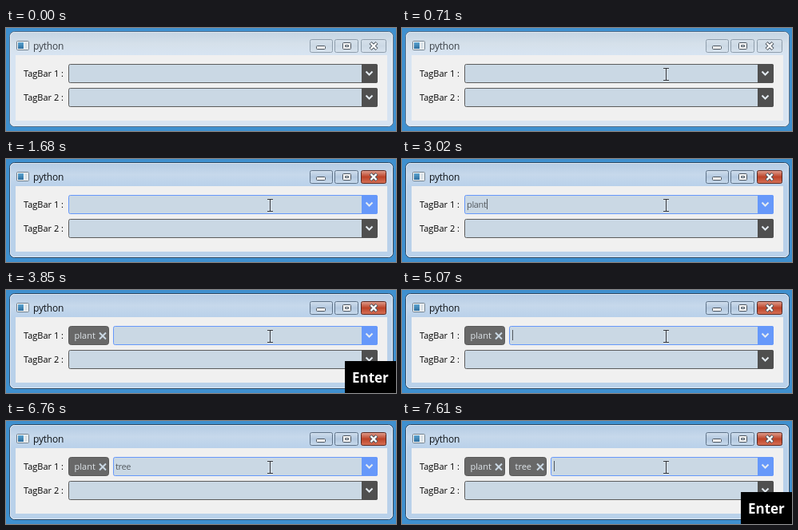
These frames come from a looping animation (488 px wide and 129 px high, 8000 ms). An HTML page with a canvas:

```html
<!DOCTYPE html>
<html lang="en">
<head>
<meta charset="utf-8">
<title>Tag bar</title>
<style>
html, body { margin: 0; width: 100%; height: 100%; overflow: hidden; background: #3f90cf; }
canvas { display: block; }
</style>
</head>
<body>
<canvas width="488" height="129"></canvas>
<script>
const c = document.querySelector('canvas').getContext('2d');
const LOOP = 8000, FOCUS = 830, CLICK_END = 950;
const SANS = '"Open Sans", "Noto Sans", sans-serif';

// [time, text in the field]
const TYPING = [
  [0, ''], [2410, 'pl'], [2650, 'pla'], [2770, 'plan'], [3020, 'plant'], [3620, ''],
  [5190, 't'], [5310, 'tr'], [5670, 'tre'], [5790, 'tree'], [7240, '']
];
const TAGS = [
  { at: 3620, text: 'plant', x: 78, w: 51 },
  { at: 7240, text: 'tree', x: 134, w: 47 }
];
const CARET_ON = [[FOCUS, 1680], [2410, 3850], [4700, 6760], [7610, LOOP]];
const ENTER_ON = [[3620, 5070], [7240, LOOP]];
const ADVANCE = { p: 6, l: 2, a: 6, n: 6, t: 4, r: 4, e: 6 };

const within = (t, spans) => spans.some(([a, b]) => t >= a && t < b);

function rect(x, y, w, h, fill) {
  c.fillStyle = fill;
  c.fillRect(x, y, w, h);
}

function box(x, y, w, h, r, fill, stroke) {
  c.beginPath();
  c.roundRect(x + .5, y + .5, w - 1, h - 1, r);
  c.fillStyle = fill;
  c.fill();
  if (stroke) line(stroke, 1);
}

function line(color, width) {
  c.strokeStyle = color;
  c.lineWidth = width;
  c.stroke();
}

function path(...points) {
  c.beginPath();
  points.forEach(([x, y], i) => i ? c.lineTo(x, y) : c.moveTo(x, y));
}

function cross(x, y, r, color, width) {
  c.beginPath();
  for (const s of [-1, 1]) {
    c.moveTo(x - r, y - r * s);
    c.lineTo(x + r, y + r * s);
  }
  line(color, width);
}

function text(str, x, y, font, color, spacing = 0) {
  c.font = font + ' ' + SANS;
  c.letterSpacing = spacing + 'px';
  c.fillStyle = color;
  c.fillText(str, x, y);
}

function shade(y0, y1, ...colors) {
  const g = c.createLinearGradient(0, y0, 0, y1);
  colors.forEach((color, i) => g.addColorStop(i / (colors.length - 1), color));
  return g;
}

function drawWindow(active) {
  rect(0, 0, 488, 129, '#3f90cf');
  const glass = active ? ['#b4cbe4', '#c6d8eb', '#b9d1ea'] : ['#c4d4e3', '#d5e0ea', '#d7e4f2'];
  box(4, 4, 481, 120, 6, shade(5, 34, ...glass), active ? '#2e4862' : '#587089');
  c.beginPath();
  c.roundRect(5.5, 5.5, 478, 117, 5);
  line(active ? '#dfeaf6' : '#e6eef6', 1);
  rect(12, 34, 465, 82, '#f0f0f0');

  box(13, 16, 16, 12, 1, '#f8fafb', '#6f7f8c');
  rect(15, 18, 7, 8, shade(18, 26, '#5aa3cf', '#2e6f9f'));
  rect(23, 18, 4, 8, '#dbe3e8');
  text('python', 34, 27, '12px', active ? '#101418' : '#3c4248', -.2);

  const face = active ? ['#d3e0ee', '#b3c8df', '#c9dbed'] : ['#d6e1eb', '#ccd9e5', '#d8e3ee'];
  const edge = active ? '#5f7389' : '#8f9eac', mark = '#49525c';
  for (const [x, w] of [[380, 29], [411, 30], [444, 32]]) {
    const red = active && x === 444;
    box(x, 14, w, 17, 2, shade(14, 31, ...(red ? ['#e2a596', '#bd4429', '#d8745a'] : face)),
      red ? '#5c2820' : edge);
  }
  box(388, 22, 12, 5, 1, '#fff', mark);
  box(421, 18, 11, 9, 1, '#fff', mark);
  box(424, 21, 5, 3, 0, '#dfe8f1', mark);
  cross(460, 22.5, 4, mark, 4.2);
  cross(460, 22.5, 3.6, '#fff', 2.2);
}

function drawField(x, y, focus) {
  const color = focus ? '#6698fa' : '#4f4f4f';
  box(x, y, 465 - x, 24, 2, '#cad8e4', focus ? color : '#5c5c5c');
  c.beginPath();
  c.roundRect(445, y, 20, 24, [0, 2, 2, 0]);
  c.fillStyle = color;
  c.fill();
  path([450.5, y + 9.5], [454.5, y + 13.5], [458.5, y + 9.5]);
  line('#e4ebf1', 2);
}

function drawTag({ text: label, x, w }) {
  box(x, 45, w, 24, 3, '#686868', '#585858');
  text(label, x + 7.5, 61, '11px', '#dfe5ea');
  cross(x + w - 8, 57.5, 4, '#cad8e4', 2);
}

function drawPointer(t) {
  if (t < 100) return;
  const p = Math.min(1, Math.floor((t - 100) / 122 + .001) / 5);
  const rest = (1 - p) ** 1.5;
  const x = Math.round(330 + 22 * rest), y = Math.round(58 + 49 * rest);
  if (y < 69 || (y >= 75 && y < 99)) {
    path([x - 3, y - 7.5], [x + 4, y - 7.5], [x + .5, y - 7.5], [x + .5, y + 7.5],
      [x - 3, y + 7.5], [x + 4, y + 7.5]);
    line('rgba(255,255,255,.35)', 2.5);
    line('#30343a', 1);
  } else {
    path([x, y], [x, y + 16], [x + 4, y + 12.5], [x + 7, y + 18.5], [x + 9, y + 17.5],
      [x + 6.5, y + 12], [x + 11.5, y + 11.5]);
    c.closePath();
    c.fillStyle = '#fff';
    c.fill();
    line('#111', 1);
  }
}

function draw(t) {
  const active = t >= FOCUS;
  const tags = TAGS.filter(tag => t >= tag.at);
  const typed = TYPING.findLast(([at]) => t >= at)[1];
  const x = [78, 134, 186][tags.length];

  drawWindow(active);
  text('TagBar 1 :', 22, 61, '11px', '#000');
  text('TagBar 2 :', 22, 91, '11px', '#000');
  drawField(x, 45, active);
  drawField(78, 75, false);
  tags.forEach(drawTag);

  if (t >= FOCUS && t < CLICK_END) {
    c.beginPath();
    c.arc(328, 57, 12, 0, 7);
    c.fillStyle = '#e5d96b';
    c.fill();
  }
  text(typed, x + 3, 61, '11px', '#555b60', -.35);
  if (within(t, CARET_ON)) {
    const caret = [...typed].reduce((sum, ch) => sum + ADVANCE[ch], x + 4);
    rect(caret, 50, 1, 13, '#50565c');
  }
  drawPointer(t);

  if (within(t, ENTER_ON)) {
    rect(424, 89, 64, 40, '#000');
    text('Enter', 433, 116, 'bold 17px', '#fff');
  }
}

const start = performance.now();
function frame() {
  draw((performance.now() - start) % LOOP);
  requestAnimationFrame(frame);
}
frame();
</script>
</body>
</html>
```
